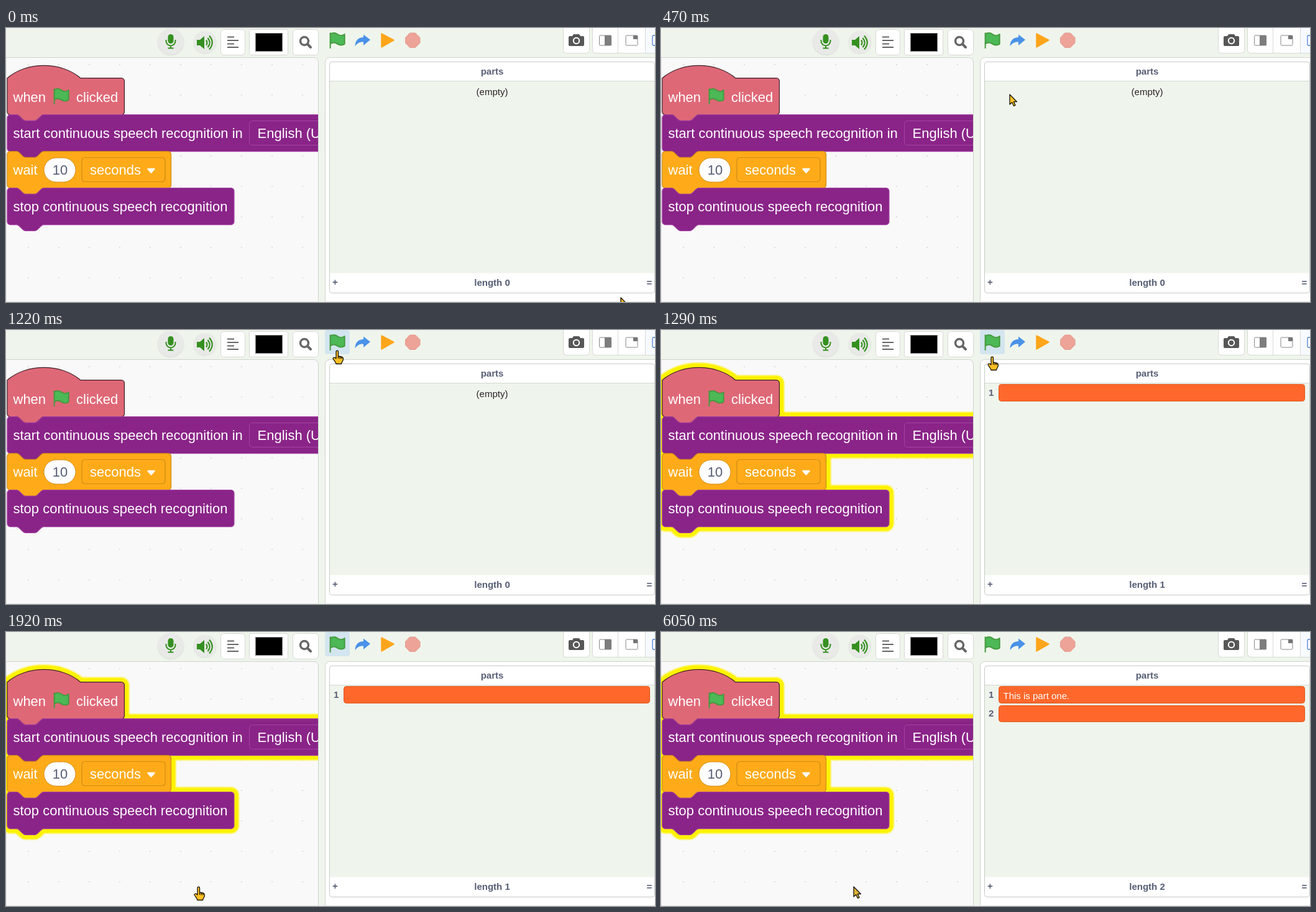
Write an HTML page that moves like this. It is 1044 px wide and 441 px high and loops after 8000 ms.

```html
<!DOCTYPE html>
<html lang="en">
<head>
<meta charset="utf-8">
<title>Continuous speech recognition blocks</title>
<style>
html, body { margin: 0; width: 100%; height: 100%; overflow: hidden; background: #eff5ec; }
svg { display: block; width: 1044px; height: 441px; }
text { font-family: "Liberation Sans", Arial, sans-serif; white-space: pre; }
.code { font-size: 22px; fill: #fff; }
.list { font-size: 15px; }
.bold { font-weight: bold; fill: #575e75; }
.mid { text-anchor: middle; }
.button { fill: #fff; stroke: #d6d9d6; }
.line { fill: none; stroke: #666; }
.row { fill: #ff672b; stroke: #e0561c; }
.cursor { fill: #ffc023; stroke: #15120c; stroke-width: 1.3; stroke-linejoin: round; }
</style>
</head>
<body>
<svg viewBox="0 0 1044 441">
  <defs>
    <clipPath id="area"><path d="M0 48H495a7 7 0 0 1 7 7V441H0z"/></clipPath>
    <filter id="soft" x="-10%" y="-10%" width="120%" height="120%"><feGaussianBlur stdDeviation="1"/></filter>
    <pattern id="dots" x="35" y="58" width="49" height="49" patternUnits="userSpaceOnUse">
      <rect width="2" height="2" fill="#dfdfdf"/>
    </pattern>
    <g id="flag" fill="#4cb856" stroke="#45993d" stroke-width="1.3" stroke-linecap="round" stroke-linejoin="round">
      <path d="M.75 2A6.44 6.44 0 0 1 8.44 2A6.440 6.440 0 0 0 16.130 2V12.400A6.440 6.440 0 0 1 8.440 12.400A6.440 6.440 0 0 0 .75 12.400M.75 16.750V.75"/>
    </g>
  </defs>

  <!-- left toolbar -->
  <circle cx="265" cy="23" r="21" fill="#d9ddd7" filter="url(#soft)"/>
  <circle cx="265" cy="22" r="20.500" fill="#e9eae8"/>
  <circle cx="320" cy="23.500" r="18" fill="#dce0da" filter="url(#soft)"/>
  <circle cx="320" cy="23" r="17.500" fill="#e9eae8"/>
  <rect x="260.500" y="10" width="9" height="15" rx="4.500" fill="#359020"/>
  <path d="M257.500 19v2a7.500 7.500 0 0 0 15 0v-2M265 28.500v4M260.500 32.500h9" fill="none" stroke="#359020" stroke-width="2"/>
  <path d="M307 19h5l7-6v21l-7-6h-5z" fill="#359020"/>
  <path d="M322 19.500q3 4 0 8M324.500 16q6.500 7.500 0 15M327 12.500q9.500 11 0 22" fill="none" stroke="#359020" stroke-width="2.200"/>
  <rect class="button" x="345.500" y="2.500" width="39" height="41" rx="5"/>
  <path class="line" stroke-width="2.200" d="M356 14.500h11M356 20h18M356 25.500h11M356 31h18"/>
  <rect class="button" x="391.500" y="2.500" width="62" height="41" rx="2"/>
  <rect x="401.500" y="8.500" width="43" height="29" stroke="#777"/>
  <rect class="button" x="461.500" y="2.500" width="41" height="41" rx="5"/>
  <circle class="line" cx="480" cy="21" r="6.500" stroke-width="3.400"/>
  <path class="line" stroke-width="4" stroke-linecap="round" d="M485.500 26.500l4.500 4.500"/>

  <!-- workspace -->
  <path d="M0 47.500H495a7.500 7.500 0 0 1 7.500 7.500V441H0z" fill="#f9f9f9" stroke="#d0d4cf"/>
  <g clip-path="url(#area)">
    <rect y="48" width="503" height="393" fill="url(#dots)"/>
    <g id="glow" fill="#fff200" stroke="#fff200" stroke-width="12.500" stroke-linejoin="round" filter="url(#soft)"></g>
    <g id="blocks"></g>
    <text class="code" x="11.500" y="119">when</text>
    <use href="#flag" transform="translate(76.500 97) scale(1.500)"/>
    <text class="code" x="113" y="119">clicked</text>
    <text class="code" x="11.500" y="177">start continuous speech recognition in</text>
    <rect x="391.500" y="149.500" width="160" height="39" rx="5" fill="none" stroke="#a444a2"/>
    <text class="code" x="404.500" y="177">English (U</text>
    <text class="code" x="11.500" y="236">wait</text>
    <rect x="61" y="209" width="51" height="39" rx="19.500" fill="#fff" stroke="#cf8b17"/>
    <text class="code mid" x="87" y="236" style="fill:#575e75">10</text>
    <rect x="122" y="208.500" width="134" height="39" rx="5" fill="none" stroke="#cf8b17" stroke-width="1.200"/>
    <text class="code" x="135" y="236">seconds</text>
    <path d="M228.500 227h10l-5 5.500z" fill="#fff" stroke="#fff" stroke-width="2.500" stroke-linejoin="round"/>
    <text class="code" x="11.500" y="295">stop continuous speech recognition</text>
  </g>

  <!-- right toolbar -->
  <rect id="hover" x="513" width="40" height="39" rx="4" fill="#d3e5ef"/>
  <use href="#flag" transform="translate(520.500 7) scale(1.500)"/>
  <path d="M561.500 29.500C561.500 20 567 15 575 15V10.500L586 19L575 28V22.500C569 22 565 24 561.500 29.500z" fill="#4a92e8"/>
  <path d="M604 9L624 19.500L604 31z" fill="#ffa51b" stroke="#ffa51b" stroke-width="1.500" stroke-linejoin="round"/>
  <path d="M649.500 8h9l7.500 7.500v8.500l-7.500 7.500h-9l-7-7.500v-8.500z" fill="#eda397" stroke="#e59a8e" stroke-linejoin="round"/>
  <rect class="button" x="896.500" y="-6.500" width="42" height="47" rx="5"/>
  <path d="M907 13h4l2-3h9l2 3h4a2 2 0 0 1 2 2v12a2 2 0 0 1-2 2h-21a2 2 0 0 1-2-2v-12a2 2 0 0 1 2-2z" fill="#575757"/>
  <circle cx="917.500" cy="20.500" r="4.700" fill="#575757" stroke="#fff" stroke-width="2"/>
  <rect class="button" x="943.500" y="-6.500" width="110" height="47" rx="5"/>
  <path d="M1028.500 0H1044V40H1028.500z" fill="#f7faff"/>
  <path d="M984.500 0V40M1028.500 0V40" stroke="#d6d9d6"/>
  <rect x="954.500" y="12" width="19" height="16" rx="1.500" fill="#fff" stroke="#858585"/>
  <path d="M963 12h11v16h-11z" fill="#7d7d7d"/>
  <rect x="997" y="12" width="19" height="16" rx="1.500" fill="#fff" stroke="#858585"/>
  <path d="M1009 12h7v6h-7z" fill="#757575"/>
  <rect x="1040" y="12" width="19" height="16" rx="1.500" fill="#fff" stroke="#4a7fd8" stroke-width="1.300"/>

  <!-- list monitor -->
  <path d="M513.500 441V55a7.500 7.500 0 0 1 7.500-7.500H1045V441z" fill="#fff" stroke="#d0d4cf"/>
  <rect x="520.500" y="54.500" width="523" height="372" rx="4" fill="#fff" stroke="#c5cbc5"/>
  <path d="M521 86H1043V394.500H521z" fill="#eff5ec"/>
  <path d="M521 85.500H1043" stroke="#d3d8d3"/>
  <text class="list bold mid" x="782" y="75">parts</text>
  <text class="list mid" id="empty" x="782" y="108" fill="#2a2226">(empty)</text>
  <g id="first">
    <text class="list bold" x="527" y="106">1</text>
    <rect class="row" x="543.500" y="87.500" width="492" height="27" rx="4"/>
  </g>
  <g id="second">
    <text class="list" x="550.500" y="108" fill="#fff">This is part one.</text>
    <text class="list bold" x="527" y="136">2</text>
    <rect class="row" x="543.500" y="118.500" width="492" height="26" rx="4"/>
  </g>
  <text class="list bold" x="525" y="414">+</text>
  <text class="list bold mid" id="length" x="782" y="415">length 0</text>
  <text class="list bold" x="1030.500" y="415">=</text>

  <path class="cursor" id="arrow" d="M0 0V16L3.700 12.700L6.500 18.500L9 17.300L6.400 11.700H11.500z"/>
  <path class="cursor" id="hand" d="M-2 13V2C-2-.5 1.500-.5 1.500 2V9L6 10C8.500 10.500 9.500 11 9.500 13.500C9.500 17 7 18 6.500 21.500H-2C-3 18-6 15-7 13C-7 10.500-4 10.500-2 13zM1.500 9V13M4.200 10V13.500M6.800 10.500V13.500"/>
</svg>
<script>
const LOOP = 8000, STEP = 70;
const $ = id => document.getElementById(id);
const show = (id, on) => $(id).setAttribute('visibility', on ? 'visible' : 'hidden');

const notchTop = 'c2 0 3 1 4 2l4 4c1 1 2 2 4 2h12c2 0 3-1 4-2l4-4c1-1 2-2 4-2';
const notchBottom = 'c-2 0-3 1-4 2l-4 4c-1 1-2 2-4 2h-12c-2 0-3-1-4-2l-4-4c-1-1-2-2-4-2';

function blockPath(width, isHat) {
  const top = isHat ? 'M0 0c25-22 71-22 96 0' : 'M0 4a4 4 0 0 1 4-4h8' + notchTop;
  return `${top}H${width - 4}a4 4 0 0 1 4 4V44a4 4 0 0 1-4 4H48${notchBottom}H4a4 4 0 0 1-4-4z`;
}

[
  [153.4, '#df6877', '#40222a'],
  [460, '#8a2488', '#a03a9e'],
  [214.5, '#ffab19', '#cf8b17'],
  [297, '#8a2488', '#a03a9e']
].forEach(([width, fill, stroke], i) => {
  const place = `d="${blockPath(width, i === 0)}" transform="translate(2 ${80.7 + 58.95 * i}) scale(1.2286)"`;
  $('glow').innerHTML += `<path ${place}/>`;
  $('blocks').innerHTML += `<path ${place} fill="${fill}" stroke="${stroke}"/>`;
});

// Pointer positions, one per STEP
const toFlag = [[920, 400], [822, 348], [706, 271], [652, 232], [595, 160], [573, 133],
  [561, 107], [551, 84], [544, 65], [538, 50], [534, 40], [533, 33]];
const toCorner = [[533, 43], [518, 73], [489, 125], [443, 212], [392, 285], [354, 331],
  [339, 356], [327, 376], [315, 398], [310, 410]];

function pointerAt(t) {
  if (t < 70) return [989, 434];
  const [path, start] = t < 1290 ? [toFlag, 50] : [toCorner, 1290];
  return path[Math.min(path.length - 1, Math.floor((t - start) / STEP))];
}

function draw(now) {
  const t = now % LOOP;
  const items = t < 1290 ? 0 : t < 6050 ? 1 : 2;
  const overButton = t >= 820 && t < 2710;
  show('glow', items > 0);
  show('empty', items === 0);
  show('first', items > 0);
  show('second', items > 1);
  $('length').textContent = 'length ' + items;
  show('hover', t >= 890 && t < 2710);
  show('hand', overButton);
  show('arrow', !overButton);
  const [x, y] = pointerAt(t);
  for (const id of ['hand', 'arrow']) $(id).setAttribute('transform', `translate(${x} ${y})`);
  $('arrow').style.fill = t < 2710 ? '#ffc023' : '#deb438';
}

const begin = performance.now();
(function tick() {
  draw(performance.now() - begin);
  requestAnimationFrame(tick);
})();
</script>
</body>
</html>
```
